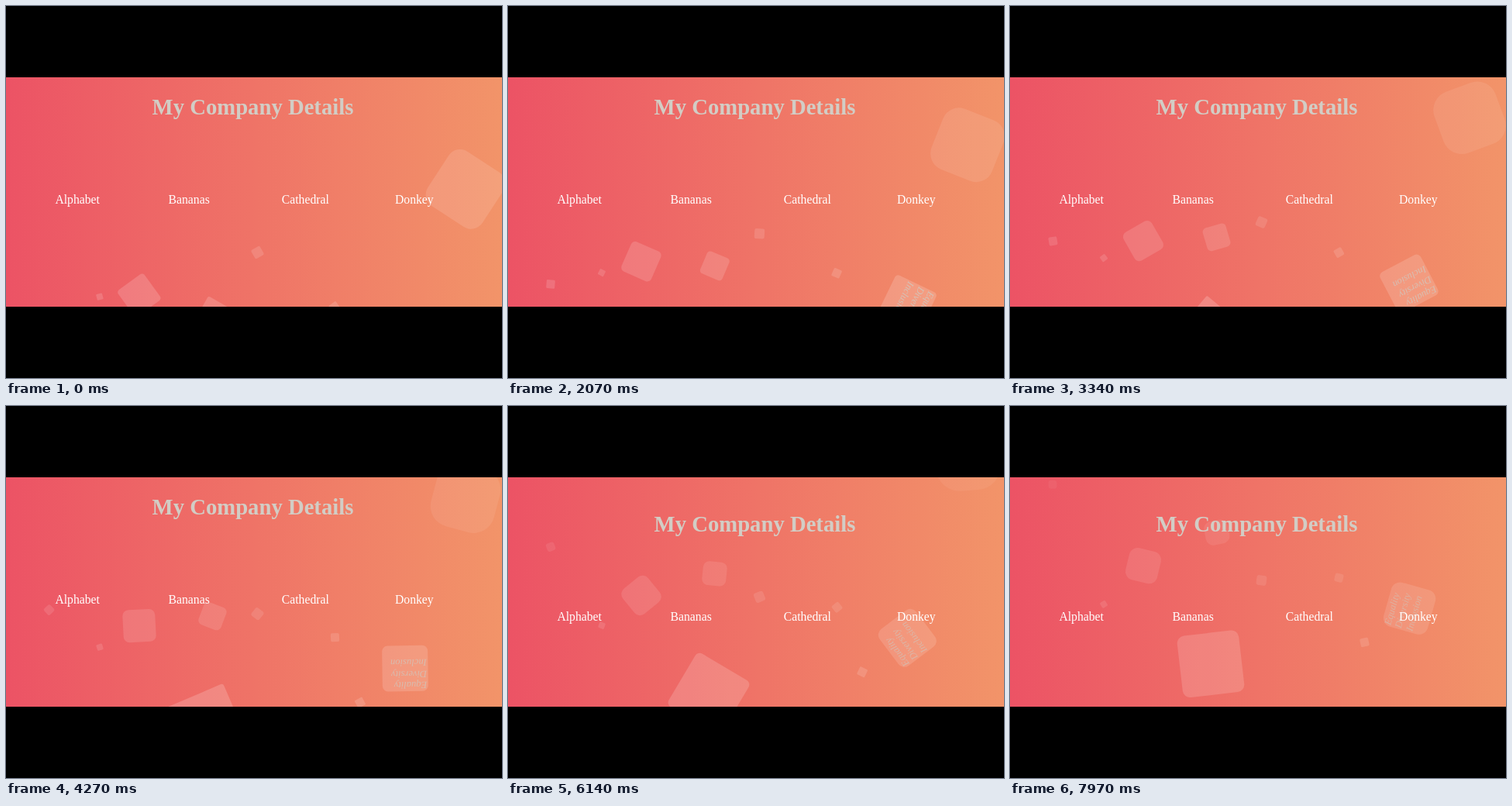
Recreate the animation shown at these times as an HTML page. Size 640 by 480 pixels, loop 8000 ms.

```html
<!DOCTYPE html>
<html lang="en">
<head>
<meta charset="utf-8">
<title>Company details</title>
<style>
  @property --p { syntax: "<number>"; inherits: false; initial-value: 0; }

  html, body { margin: 0; width: 100%; height: 100%; overflow: hidden; background: #000; }

  .stage {
    position: absolute; left: 0; top: 92px; width: 640px; height: 296px; overflow: hidden;
    background: linear-gradient(to right, #ec5365, #f29469);
    font-family: "Liberation Serif", "Times New Roman", serif;
  }

  /* --x: left in percent, --s: size, --age: seconds already flown, --t: flight time */
  .box {
    position: absolute; bottom: -110.6px;
    left: calc(var(--x) * 6.7px - 17px);
    width: calc(var(--s) * 1px); height: calc(var(--s) * 1px);
    background: rgba(255, 255, 255, .2);
    transform: translateY(calc(var(--p) * -524px)) rotate(calc(var(--p) * 720deg));
    border-radius: calc(var(--p) * 50%);
    opacity: calc(1 - var(--p));
    animation: rise 8s linear infinite;
  }
  @keyframes rise {
    from { --p: calc(var(--age) / var(--t)); }
    to { --p: calc((var(--age) + 8) / var(--t)); }
  }

  .values {
    box-sizing: border-box; padding: 1px 0 0 1.5px;
    font-size: 12.58px; line-height: 14.45px; font-style: italic; color: #d0cdc6;
  }

  .copy { position: absolute; inset: 0; animation: drop 8s step-end infinite; }
  @keyframes drop {
    0% { transform: none; }
    65% { transform: translateY(21.5px); }
  }
  h1, .copy span { position: absolute; margin: 0; white-space: nowrap; }
  h1 { left: 188.6px; top: 22.3px; font-size: 28.7px; line-height: 32px; color: #d2cdc5; }
  .copy span {
    left: calc(63.4px + var(--i) * 146.2px); top: 149.2px;
    font-size: 15.7px; line-height: 18px; color: #fff;
  }
</style>
</head>
<body>
<div class="stage">
  <div class="box" style="--x:25; --s:41.9; --age:5; --t:25"></div>
  <div class="box" style="--x:10; --s:10.5; --age:1; --t:12"></div>
  <div class="box" style="--x:70; --s:10.5; --age:1; --t:25"></div>
  <div class="box" style="--x:40; --s:31.4; --age:3; --t:18"></div>
  <div class="box" style="--x:65; --s:10.5; --age:5; --t:25"></div>
  <div class="box values" style="--x:75.1; --s:58.5; --age:1.95; --t:25">Equality<br>Diversity<br>Inclusion</div>
  <div class="box" style="--x:35.2; --s:80; --age:-1.95; --t:25"></div>
  <div class="box" style="--x:50; --s:13.1; --age:15; --t:45"></div>
  <div class="box" style="--x:20; --s:7.9; --age:8; --t:35"></div>
  <div class="box" style="--x:84.8; --s:84; --age:8; --t:19"></div>
  <div class="copy">
    <h1>My Company Details</h1>
    <span style="--i:0">Alphabet</span>
    <span style="--i:1">Bananas</span>
    <span style="--i:2">Cathedral</span>
    <span style="--i:3">Donkey</span>
  </div>
</div>
</body>
</html>
```
